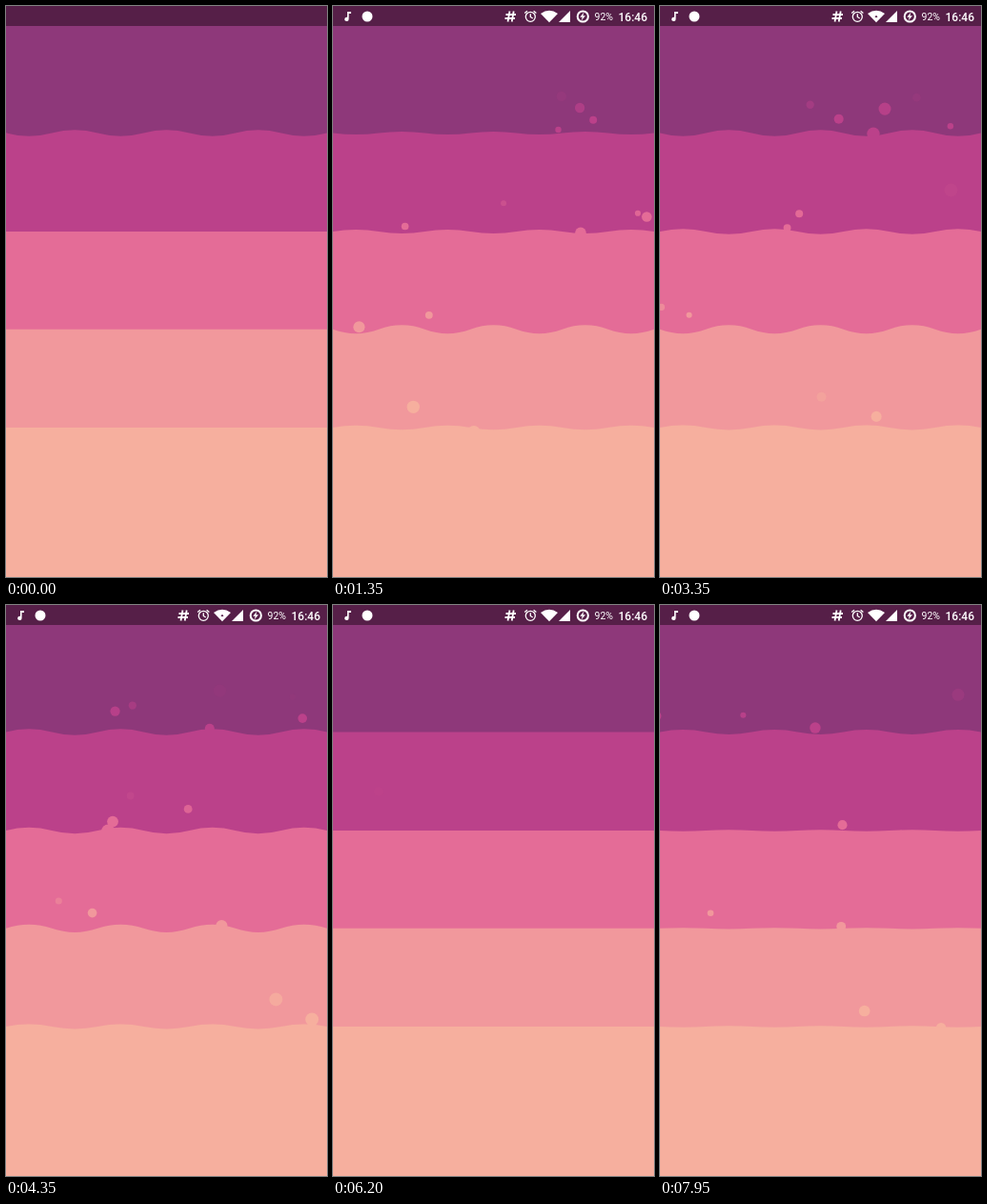
Recreate the animation shown at these times as an HTML page with a canvas. Size 337 by 600 pixels, loop 8 s.

```html
<!DOCTYPE html>
<html lang="en">
<head>
<meta charset="utf-8">
<title>Waves</title>
<style>
  html, body { margin: 0; width: 100%; height: 100%; overflow: hidden; background: #8e387a; }
  canvas { display: block; width: 337px; height: 600px; }
</style>
</head>
<body>
<canvas></canvas>
<script>
const W = 337, H = 600, LOOP = 8000, SEGMENTS = 7;
const BAR = '#561f48';
const canvas = document.querySelector('canvas');
const ctx = canvas.getContext('2d');
const scale = window.devicePixelRatio || 1;
canvas.width = W * scale;
canvas.height = H * scale;

const clamp = v => Math.max(0, Math.min(1, v));
const smooth = (t, from, to) => {
  const f = clamp((t - from) / (to - from));
  return f * f * (3 - 2 * f);
};

// rate is in half turns per second; wake holds the two moments at which a wave starts up.
const layers = [
  { base: 133.5, color: '#bb418a', height: 3.4, rate: 1.15, phase: 0.1, wake: [-700, 6400] },
  { base: 237, color: '#e46c97', height: 3.8, rate: 1.95, phase: 0.7, wake: [100, 7750] },
  { base: 339.8, color: '#f1989c', height: 4.8, rate: 2.95, phase: 0, wake: [850, 7500] },
  { base: 443, color: '#f6af9e', height: 2.6, rate: 2, phase: 0.2, wake: [850, 7750] },
];

const energy = ([first, second], t) =>
  smooth(t, first, first + 600) * (1 - smooth(t, 4500, 6150)) + smooth(t, second, second + 600);

const swing = (layer, t) => layer.height * energy(layer.wake, t) *
  Math.cos(Math.PI * (layer.phase + layer.rate * t / 1000));

let seed = 7;
const random = (from, to) => {
  seed = seed * 16807 % 2147483647;
  return from + (to - from) * seed / 2147483647;
};

layers.forEach((layer, i) => {
  const [first, second] = layer.wake;
  const gap = 260 + 70 * i;
  layer.bubbles = [];
  for (let born = 0; born < LOOP; born += random(0.5, 1.5) * gap) {
    const awake = born > first - 400 && born < 5000 || born > second - 400;
    if (awake) layer.bubbles.push({ born, x: random(0, W), r: random(3, 7), drift: random(-15, 15) });
  }
});

function circle(x, y, r) {
  ctx.beginPath();
  ctx.arc(x, y, r, 0, 2 * Math.PI);
}

// Bubbles rise from below the surface and fade out near the top of their path.
function drawBubble({ born, x, r, drift }, base, t) {
  const age = (t - born) / 1000;
  if (age < 0) return;
  const rise = (16 + 4.2 * r) * age - r;
  ctx.globalAlpha = clamp((32 + 2 * r - rise) / 22);
  circle(x + drift * age, base - rise, r);
  ctx.fill();
}

function drawLayer(layer, t) {
  const { base, color, bubbles } = layer;
  ctx.fillStyle = color;
  bubbles.forEach(b => drawBubble(b, base, t));
  ctx.globalAlpha = 1;
  const bend = 2 * swing(layer, t), step = W / SEGMENTS;
  ctx.beginPath();
  ctx.moveTo(0, base);
  for (let i = 0; i < SEGMENTS; i++) {
    ctx.quadraticCurveTo((i + 0.5) * step, base + (i % 2 ? -bend : bend), (i + 1) * step, base);
  }
  ctx.lineTo(W, H);
  ctx.lineTo(0, H);
  ctx.fill();
}

const icons = {
  note: new Path2D('M15 6h4v2h-2.4v5.800a2.200 2.200 0 1 1-1.600-2z'),
  hash: new Path2D('M185.500 5.500L183.500 16.500M189.700 5.500L187.700 16.500M181.500 9H192M180.500 13H191'),
  alarm: new Path2D('M207.300 8.300V11.500L209.700 13M201.200 7.500L204 5.200M213.400 7.500L210.600 5.200'),
  wifi: new Path2D('M218 8Q227 1.500 236 8L227 17.300Z'),
  signal: new Path2D('M237 17L249 5V17Z'),
  bolt: new Path2D('M263.500 6.500L259.300 11.700H261.800L260.600 15.500L265 10.300H262.400Z'),
  arrow: new Path2D('M225.500 12L227 9.500L228.500 12Z'),
};

function drawStatusBar(t) {
  ctx.fillStyle = BAR;
  ctx.fillRect(0, 0, W, 21);
  ctx.globalAlpha = clamp((t - 20) / 230);
  ctx.fillStyle = ctx.strokeStyle = '#fff';
  for (const name of ['note', 'wifi', 'signal', 'bolt']) ctx.fill(icons[name]);
  circle(36, 11, 5.5);
  ctx.fill();
  ctx.lineWidth = 1.8;
  ctx.stroke(icons.hash);
  ctx.lineWidth = 1.3;
  ctx.stroke(icons.alarm);
  circle(207.3, 11.3, 5);
  ctx.stroke();
  ctx.lineWidth = 2;
  circle(262.3, 11, 5.6);
  ctx.stroke();
  ctx.font = '10.5px Roboto, sans-serif';
  ctx.fillText('92%', 274.5, 15);
  ctx.font = '500 12px Roboto, sans-serif';
  ctx.fillText('16:46', 299.5, 15.5);
  if (t > 3000 && t < 4700) {
    ctx.fillStyle = BAR;
    ctx.fill(icons.arrow);
  }
  ctx.globalAlpha = 1;
}

function draw(elapsed) {
  const t = elapsed % LOOP;
  ctx.setTransform(scale, 0, 0, scale, 0, 0);
  ctx.fillStyle = '#8e387a';
  ctx.fillRect(0, 0, W, H);
  layers.forEach(layer => drawLayer(layer, t));
  drawStatusBar(t);
}

let start;
function tick(now) {
  start ??= now;
  draw(now - start);
  requestAnimationFrame(tick);
}
draw(0);
requestAnimationFrame(tick);
</script>
</body>
</html>
```
